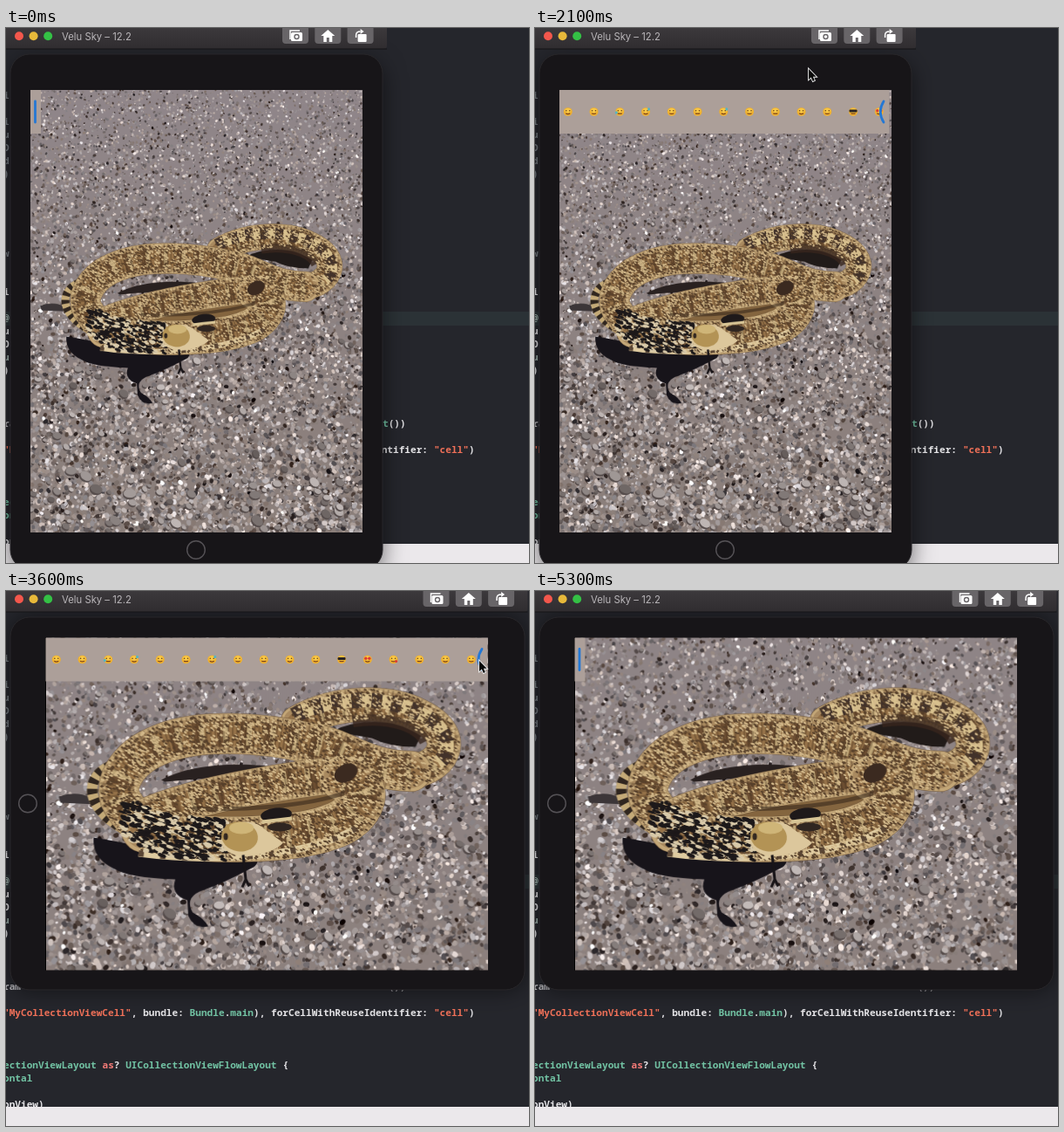
Recreate the animation shown at these times as an HTML page with a canvas. Size 600x613 px, loop 5400 ms.

```html
<!DOCTYPE html>
<html>
<head>
<meta charset="utf-8">
<style>
html, body { margin: 0; width: 100%; height: 100%; overflow: hidden; background: #25262c; }
canvas { display: block; }
</style>
</head>
<body>
<canvas id="stage" width="600" height="613"></canvas>
<script>
const LOOP = 5400, STEP = 100;
const ctx = document.getElementById('stage').getContext('2d');
const photo = makePhoto();

function random(seed) {
  return () => {
    seed = seed + 0x6D2B79F5 | 0;
    let n = Math.imul(seed ^ seed >>> 15, 1 | seed);
    n = n + Math.imul(n ^ n >>> 7, 61 | n) ^ n;
    return ((n ^ n >>> 14) >>> 0) / 4294967296;
  };
}

function dot(c, x, y, rx, ry, fill, turn = 0) {
  c.fillStyle = fill;
  c.beginPath();
  c.ellipse(x, y, rx, ry, turn, 0, 7);
  c.fill();
}

function box(c, x, y, w, h, r, fill) {
  c.fillStyle = fill;
  c.beginPath();
  c.roundRect(x, y, w, h, r);
  c.fill();
}

function line(c, path, color, width, dash = []) {
  c.strokeStyle = color;
  c.lineWidth = width;
  c.setLineDash(dash);
  c.stroke(new Path2D(path));
  c.setLineDash([]);
}

function shape(c, path, fill) {
  c.fillStyle = fill;
  c.fill(new Path2D(path));
}

// Gravel and a coiled snake, drawn once.
function makePhoto() {
  const canvas = document.createElement('canvas');
  canvas.width = 508;
  canvas.height = 676;
  const c = canvas.getContext('2d'), rnd = random(7);
  const ground = c.createLinearGradient(0, 0, 0, 676);
  ground.addColorStop(0, '#90868a');
  ground.addColorStop(1, '#8b7f7a');
  c.fillStyle = ground;
  c.fillRect(0, 0, 508, 676);
  for (let i = 0; i < 15000; i++) {
    const y = rnd() * 676, r = (.8 + rnd() * 1.9) * (.65 + y / 900);
    const l = 138 + (rnd() + rnd() + rnd() - 1.5) * 95, warm = rnd() * 12;
    dot(c, rnd() * 508, y, r * 1.3, r, `rgb(${l + warm},${l - 4},${l - warm})`, rnd() * 3);
  }
  for (let i = 0; i < 320; i++) {
    const y = 676 - rnd() * rnd() * 676, r = 1.5 + rnd() * rnd() * 8 * y / 676, x = rnd() * 508;
    const l = 95 + rnd() * 95, turn = rnd();
    dot(c, x - 1, y + 1.5, r * 1.25, r, '#554c4b', turn);
    dot(c, x, y, r * 1.2, r * .85, `rgb(${l + 5},${l - 3},${l - 5})`, turn);
  }

  // Shadow on the ground.
  c.translate(-45, 94.5);
  c.lineJoin = 'round';
  shape(c, 'M100 282Q150 290 180 300L285 300Q294 312 280 318Q250 334 222 344Q205 352 214 368Q226 374 232 384Q216 388 209 372L208 354Q188 348 194 330Q140 328 124 318Q98 306 100 282Z', '#17141a');
  shape(c, 'M60 235Q80 228 96 236L104 244L62 242Z', '#3c3638');

  const tail = 'M120 200C92 210 86 244 134 272';
  line(c, tail, '#c4aa78', 12);
  line(c, tail, '#30261f', 12, [6, 6]);

  const band = (path, w) => {
    c.lineCap = 'round';
    line(c, path, '#6d5439', w + 1);
    line(c, path, '#c3a677', w);
    line(c, path, '#a98a60', w * .84);
    line(c, path, '#957249', w * .6);
    c.lineCap = 'butt';
    line(c, path, 'rgba(82,56,35,.6)', w * .66, [13, 14]);
    line(c, path, 'rgba(217,192,140,.75)', w * .56, [6, 21]);
    line(c, path, 'rgba(60,40,25,.3)', w * .96, [2, 3]);
    return [new Path2D(path), w];
  };
  shape(c, 'M375 160Q410 140 480 158L470 178Q440 178 420 168Z', '#211b19');
  const far = band('M334 150C380 124 440 124 474 142C526 166 500 208 455 207', 38);
  const edge = 'M330 142C380 118 440 120 476 140C512 158 512 186 496 196';
  line(c, edge, '#d9c28f', 16);
  line(c, edge, '#42322a', 18, [12, 11]);
  line(c, 'M398 149C440 143 472 154 481 172', 'rgba(55,38,29,.8)', 13);

  const upper = band('M465 206C410 205 390 180 350 174C290 160 220 158 180 174C136 190 118 226 136 246C150 270 170 280 190 284', 46);
  shape(c, 'M178 216C210 198 262 196 300 200L230 214L182 218Z', '#292120');
  shape(c, 'M150 250L300 215L400 205L410 250L340 280L150 285Z', '#84653f');
  const middle = band('M160 258C220 232 310 218 388 209', 42);
  const front = band('M386 214C424 218 412 258 372 270C330 286 220 290 158 273', 52);
  line(c, 'M205 248C270 252 345 246 388 231', 'rgba(50,35,25,.55)', 5);

  // Belly, neck pattern and scales.
  const belly = 'M152 300C240 312 350 304 404 270';
  line(c, belly, '#dfcba0', 8);
  line(c, belly, '#5a4635', 7, [6, 19]);
  const scatter = (count, x, y, w, h, coils, paint) => {
    for (let i = 0; i < count; i++) {
      const px = x + rnd() * w, py = y + rnd() * h;
      const inside = coils.some(([path, width]) => {
        c.lineWidth = width - 4;
        return c.isPointInStroke(path, px - 45, py + 94.5);
      });
      if (inside) paint(px, py);
    }
  };
  scatter(9000, 105, 110, 420, 200, [far, upper, middle, front], (x, y) =>
    dot(c, x, y, 1.9, 1, rnd() < .5 ? '#57402b' : '#d3b98b', .5));
  scatter(620, 133, 242, 120, 66, [front, upper], (x, y) =>
    dot(c, x, y, 2 + rnd() * 3.5, 1.2 + rnd() * 1.3, rnd() < .64 ? '#1d191a' : '#d8c9a9', .35));

  // Head and tongue.
  dot(c, 310, 256, 18, 8, '#1e191a', -.1);
  dot(c, 314, 270, 14, 5, '#302621');
  line(c, 'M294 264L328 260', '#d8c596', 4);
  dot(c, 390, 208, 14, 10, '#3b2a20', -.5);
  shape(c, 'M250 276C258 262 284 260 296 272L318 288Q308 300 274 304Q250 302 246 286Z', '#dcc79c');
  dot(c, 268, 281, 21, 17, '#b39355', .15);
  dot(c, 270, 271, 14, 7, '#cfb578');
  dot(c, 252, 281, 2.5, 4, '#332820');
  line(c, 'M272 302L275 330L271 339M275 330L279 338', '#191518', 3);
  return canvas;
}

// Linear track: rows of [time, ...values].
function track(t, rows) {
  const i = rows.findIndex(row => row[0] > t);
  if (i < 0) return rows.at(-1).slice(1);
  if (!i) return rows[0].slice(1);
  const a = rows[i - 1], b = rows[i], u = (t - a[0]) / (b[0] - a[0]);
  return a.slice(1).map((v, k) => v + (b[k + 1] - v) * u);
}

function code(x, y, ...runs) {
  ctx.font = '600 11.125px "Noto Sans Mono", "DejaVu Sans Mono", monospace';
  for (const [text, color] of runs) {
    ctx.fillStyle = color;
    ctx.fillText(text, x, y + 3.6);
    x += text.length * 6.675;
  }
}

function editor() {
  const white = '#e6e5e8', mint = '#72c3a4', red = '#ef7058';
  ctx.fillStyle = '#25262c';
  ctx.fillRect(0, 0, 600, 613);
  ctx.fillStyle = '#2b3236';
  ctx.fillRect(0, 325, 600, 16);
  for (const [y, s] of [[77, 'i'], [107, 'i'], [122, 'u'], [137, 'D'], [152, 'd'], [167, ')'], [258, 'w']])
    code(-3, y, [s, '#747a80']);
  for (const [y, s] of [[302, 'i'], [332, '@'], [347, 'u'], [362, 'O'], [377, 'u'], [392, ')']])
    code(-3, y, [s, y == 332 || y == 377 ? '#a3b5b0' : white]);
  code(-3, 453, ['ram', '#b9b8bc']);
  code(432, 453, ['t', mint], ['())', white]);
  code(-3, 483, ['"MyCollectionViewCell"', red], [', bundle: ', white], ['Bundle', mint], ['.', white],
    ['main', mint], ['), forCellWithReuseIdentifier: ', white], ['"cell"', red], [')', white]);
  code(-3, 543, ['ectionViewLayout ', mint], ['as', '#f47b78'], ['? ', white], ['UICollectionViewFlowLayout', mint], [' {', white]);
  code(-3, 558, ['ontal', mint]);
  code(-3, 588, ['onView)', white]);
  ctx.fillStyle = '#ebe8eb';
  ctx.fillRect(0, 591, 600, 22);
}

function titleBar(right) {
  const g = ctx.createLinearGradient(0, 0, 0, 24);
  g.addColorStop(0, '#3c393c');
  g.addColorStop(1, '#302d30');
  box(ctx, -8, -8, right + 8, 32, 4, g);
  ctx.fillStyle = '#151416';
  ctx.fillRect(0, 23.5, right, 1);
  ['#f4574c', '#e8b93a', '#34c145'].forEach((color, i) => dot(ctx, 15 + i * 16.6, 9.3, 5, 5, color));
  ctx.font = '11.3px Inter, sans-serif';
  ctx.fillStyle = '#b9b6b9';
  ctx.fillText('Velu Sky – 12.2', 64, 13.5);

  for (let i = 0; i < 3; i++) {
    ctx.save();
    ctx.translate(right - 105 + i * 37.3, 9);
    box(ctx, -15, -12, 30, 21, 4, '#686568');
    if (i == 0) {
      line(ctx, 'M-6 4V-6H5', '#fff', 1.5);
      box(ctx, -5, -4, 13, 10, 1.5, '#fff');
      dot(ctx, 1.5, 1, 3.2, 3.2, '#686568');
      dot(ctx, 1.5, 1, 1.8, 1.8, '#fff');
    } else if (i == 1) {
      shape(ctx, 'M0-7L8 0H5V7H1.5V2H-1.5V7H-5V0H-8Z', '#fff');
    } else {
      box(ctx, -3, -2, 10, 9, 1, '#fff');
      line(ctx, 'M-5 2V-1Q-5-5 0-5', '#fff', 1.5);
      shape(ctx, 'M0-8L4-5L0-2Z', '#fff');
    }
    ctx.restore();
  }
}

function face(i, x) {
  dot(ctx, x, 25, 5, 4.8, '#efb02f');
  dot(ctx, x, 23.5, 3.6, 2.6, '#f8c847');
  if (i == 11) {
    box(ctx, x - 4.5, 22.5, 9, 3, 1, '#292424');
  } else {
    const eyes = i == 12 ? '#dc3b34' : '#694016', r = i == 12 ? 1.7 : .8;
    dot(ctx, x - 2, 23.7, r, r, eyes);
    dot(ctx, x + 2, 23.7, r, r, eyes);
  }
  line(ctx, `M${x - 2.5} 26.8Q${x} ${28.5 - i % 3 * .5} ${x + 2.5} 26.8`, '#7d461b', 1.2);
  if (i == 2 || i == 3 || i == 6) dot(ctx, x + (i == 2 ? -4 : 3.5), i == 2 ? 26 : 22, 1.5, 1.8, '#53b5c5');
  if (i == 13) dot(ctx, x + 3, 27, 1.6, 1.5, '#dc3b34');
}

function drawer(w, gap) {
  const right = w - gap;
  ctx.fillStyle = '#ac9f99';
  ctx.fillRect(0, 0, right, 50);
  for (let i = 0; i < 17; i++) {
    const x = 12.3 + i * 29.75 - gap;
    if (x > 3 && x < right) face(i, x);
  }
  const bend = 8 * Math.max(0, 1 - gap / 40), x = right - 6.5;
  ctx.lineCap = 'round';
  line(ctx, `M${x} 13Q${x - bend} 25 ${x} 37`, '#2478d4', 2.8);
  ctx.lineCap = 'butt';
}

function device(t) {
  const wide = t >= 2600;
  const u = Math.min(1, Math.max(0, (t - 2930) / 400));
  const p = u * u * (3 - 2 * u);
  const w = 381 + 126 * p, h = 507 - 126 * p;
  const [cx, cy, sw, sh] = wide ? [299, 244, 508, 381] : [218.5, 324.5, 381, 507];
  const [gap] = track(t, [[1800, 369], [2000, 25], [2100, 2.5], [2300, 0], [3850, 0],
    [4200, 95], [4600, 477], [4800, 495]]);

  ctx.save();
  ctx.shadowColor = 'rgba(0,0,0,.55)';
  ctx.shadowBlur = 26;
  ctx.shadowOffsetY = wide ? 0 : 8;
  box(ctx, 5, 30, wide ? 590 : 427, wide ? 427 : 590, 22, '#171518');
  ctx.restore();
  ctx.strokeStyle = '#29272a';
  ctx.lineWidth = 1;
  ctx.stroke();
  ctx.strokeStyle = '#555256';
  ctx.lineWidth = 1.4;
  ctx.beginPath();
  ctx.arc(wide ? 25 : 218, wide ? 243.5 : 598, 10.3, 0, 7);
  ctx.stroke();

  // The picture fills the turning view and may overflow it vertically.
  ctx.save();
  ctx.translate(cx, cy);
  ctx.fillStyle = '#000';
  ctx.beginPath();
  ctx.rect(-sw / 2, -sh / 2, sw, sh);
  ctx.fill();
  ctx.clip();
  if (wide) ctx.rotate((1 - p) * Math.PI / 2);
  const s = Math.max(w / 381, h / 507);
  ctx.drawImage(photo, -190.5 * s, -253.5 * s, 381 * s, 507 * s);
  ctx.translate(-w / 2, -h / 2);
  drawer(w, gap);
  ctx.restore();
}

function pointer(t) {
  const [x, y] = track(t, [[700, -20, 140], [1200, 48, 98], [1800, 48, 98], [2100, 314, 47],
    [2400, 408, 14], [2800, 408, 14], [3200, 505, 86], [3600, 543, 80], [3850, 543, 80],
    [4200, 444, 80], [4600, 62, 84], [4900, -20, 120]]);
  ctx.save();
  ctx.translate(x, y);
  const arrow = 'M0 0V12L2.8 9.5L4.8 14L6.8 13L4.9 8.8H8.6Z';
  line(ctx, arrow, '#eee', 1.8);
  shape(ctx, arrow, '#080808');
  ctx.restore();
}

function draw(now) {
  const t = Math.floor(now % LOOP / STEP) * STEP;
  editor();
  device(t);
  titleBar(t < 2600 ? 437 : 598.5);
  pointer(t);
  requestAnimationFrame(draw);
}
requestAnimationFrame(draw);
</script>
</body>
</html>
```
